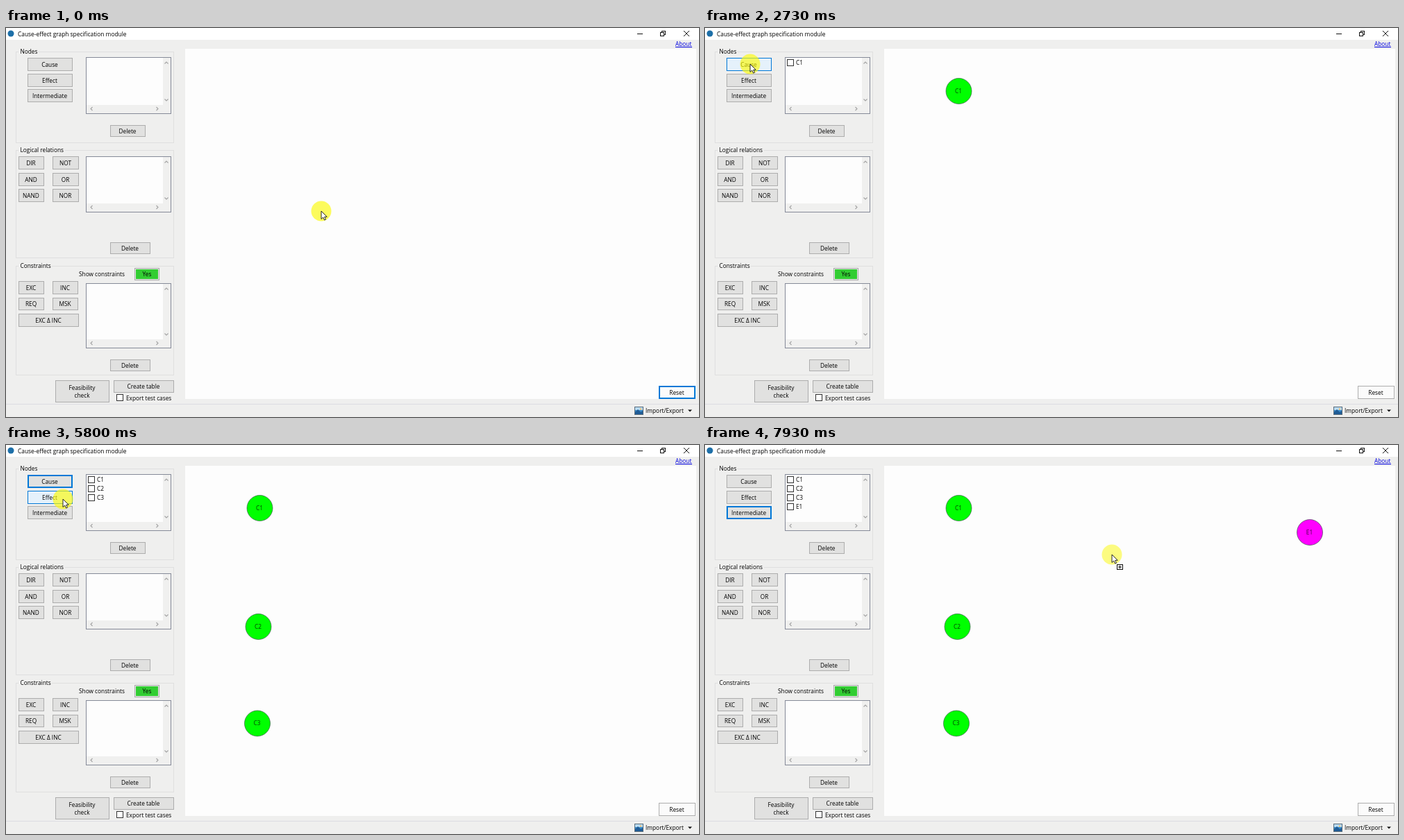
Write an HTML page with a canvas that moves like this. It is 998 px wide and 561 px high and loops after 8000 ms.

```html
<!DOCTYPE html>
<html lang="en">
<head>
<meta charset="utf-8">
<title>Cause-effect graph specification module</title>
<style>
  html, body { margin: 0; width: 100%; height: 100%; overflow: hidden; background: #efefee; }
  canvas { display: block; width: 998px; height: 561px; }
</style>
</head>
<body>
<canvas id="stage" width="998" height="561"></canvas>
<script>
const ctx = document.getElementById('stage').getContext('2d');
const LOOP = 8000;
const BLUE = '#0078d7';

// Pointer path: time, x, y. Repeated positions are pauses.
const path = [
  [0, 454, 264], [470, 454, 264], [860, 240, 142], [1260, 66, 52], [1300, 66, 52],
  [1430, 68, 49], [1700, 68, 49], [1830, 226, 58], [2060, 365, 91], [2150, 365, 91],
  [2640, 65, 52], [2830, 65, 52], [3280, 363, 262], [3400, 363, 262],
  [4150, 78, 46], [4410, 78, 46], [4630, 313, 340], [4800, 361, 401], [4920, 361, 401],
  [5720, 82, 78], [5930, 82, 78], [6550, 871, 126], [6690, 871, 126],
  [7140, 74, 94], [7300, 74, 94], [7370, 78, 87], [7520, 130, 90], [7930, 586, 158], [8000, 586, 158]
];

const drags = [
  { press: 1700, drop: 2120, button: 'Cause' },
  { press: 2830, drop: 3360, button: 'Cause' },
  { press: 4410, drop: 4860, button: 'Cause' },
  { press: 5930, drop: 6650, button: 'Effect' },
  { press: 7290, drop: LOOP, button: 'Intermediate' }
];

const nodes = [
  { label: 'C1', x: 365.5, y: 91, at: 2120, color: '#00ff00' },
  { label: 'C2', x: 363.5, y: 262, at: 3360, color: '#00ff00' },
  { label: 'C3', x: 362, y: 401.5, at: 4860, color: '#00ff00' },
  { label: 'E1', x: 871, y: 126, at: 6650, color: '#ff00ff' }
];

const groups = [['Nodes', 34, 132], ['Logical relations', 176, 156], ['Constraints', 343, 158]];
const lists = [[42, 82], [185, 81], [368, 94]];

const buttons = [
  ['Cause', 31, 43, 65, 19], ['Effect', 31, 66, 65, 19], ['Intermediate', 31, 88, 65, 19],
  ['Delete', 150, 140, 51, 17],
  ['DIR', 18, 185, 37, 19], ['NOT', 67, 185, 38, 19],
  ['AND', 18, 209, 37, 19], ['OR', 67, 209, 38, 19],
  ['NAND', 18, 232, 37, 19], ['NOR', 67, 232, 38, 19],
  ['Delete', 150, 309, 58, 17],
  ['EXC', 18, 365, 37, 19], ['INC', 67, 365, 37, 19],
  ['REQ', 18, 389, 37, 18], ['MSK', 67, 389, 37, 18],
  ['EXC Δ INC', 18, 412, 87, 19],
  ['Delete', 150, 478, 58, 17],
  ['Feasibility\ncheck', 71, 508, 78, 32], ['Create table', 155, 508, 87, 18],
  ['Reset', 940, 516, 53, 19]
];

function text(str, x, y, { align = 'left', color = '#000', size = 8.3 } = {}) {
  ctx.font = `${size}px "Open Sans", "Noto Sans", sans-serif`;
  ctx.textAlign = align;
  ctx.textBaseline = 'alphabetic';
  ctx.fillStyle = color;
  ctx.fillText(str, x, y + 3);
}

function rect(x, y, w, h, fill, stroke, width = 1) {
  if (fill) { ctx.fillStyle = fill; ctx.fillRect(x, y, w, h); }
  if (stroke) {
    ctx.strokeStyle = stroke;
    ctx.lineWidth = width;
    ctx.strokeRect(x + width / 2, y + width / 2, w - width, h - width);
  }
}

function line(points, color, width = 1) {
  ctx.beginPath();
  points.forEach(([x, y]) => ctx.lineTo(x, y));
  ctx.strokeStyle = color;
  ctx.lineWidth = width;
  ctx.stroke();
}

function polygon(points, fill, stroke) {
  ctx.beginPath();
  points.forEach(([x, y]) => ctx.lineTo(x, y));
  ctx.closePath();
  ctx.fillStyle = fill;
  ctx.fill();
  if (stroke) { ctx.strokeStyle = stroke; ctx.lineWidth = 0.9; ctx.stroke(); }
}

function circle(x, y, r, fill, stroke, width = 1) {
  ctx.beginPath();
  ctx.arc(x, y, r, 0, Math.PI * 2);
  if (fill) { ctx.fillStyle = fill; ctx.fill(); }
  if (stroke) { ctx.strokeStyle = stroke; ctx.lineWidth = width; ctx.stroke(); }
}

function checkbox(x, y) {
  rect(x, y, 10, 10, '#fff', '#333');
}

function chevron(x, y, dx, dy) {
  const tail = side => [x - dx * 1.5 + dy * side, y - dy * 1.5 + dx * side];
  line([tail(-2.5), [x + dx, y + dy], tail(2.5)], '#a3a3a3', 1.1);
}

// Cubic Hermite interpolation that comes to rest at pauses.
function pointerAt(t) {
  const i = Math.max(0, path.findIndex((p, k) => k + 1 < path.length && t < path[k + 1][0]));
  const a = path[i], b = path[i + 1];
  const span = b[0] - a[0], u = (t - a[0]) / span;
  const still = (p, q) => !p || !q || (p[1] === q[1] && p[2] === q[2]);
  const slope = (k, axis) => {
    const before = path[k - 1], here = path[k], after = path[k + 1];
    if (still(before, here) || still(here, after)) return 0;
    return (after[axis] - before[axis]) / (after[0] - before[0]);
  };
  const blend = axis => {
    const u2 = u * u, u3 = u2 * u;
    return (2 * u3 - 3 * u2 + 1) * a[axis] + (u3 - 2 * u2 + u) * span * slope(i, axis)
      + (3 * u2 - 2 * u3) * b[axis] + (u3 - u2) * span * slope(i + 1, axis);
  };
  return { x: blend(1), y: blend(2) };
}

function drawWindow() {
  rect(0, 0, 998, 561, '#efefee');
  rect(0, 0, 998, 17, '#fff');
  circle(7, 8, 4.5, '#1d6fa8');
  text('Cause-effect graph specification module', 17, 8.5, { size: 8.4 });
  line([[909, 8.5], [917, 8.5]], '#111');
  rect(944, 4, 6, 6, null, '#111');
  rect(942, 6, 6, 6, '#fff', '#111');
  line([[976, 4], [984, 12]], '#111');
  line([[984, 4], [976, 12]], '#111');
  text('About', 964, 23, { color: '#0000e0' });
  line([[964, 27.5], [988, 27.5]], '#0000e0');

  rect(258, 30, 736, 505, '#fdfdfd');
  line([[0, 542.5], [998, 542.5]], '#dcdce2');
  rect(905, 546, 13, 12, '#3c8dcb', '#5b6d7c');
  rect(906, 547, 11, 4, '#b9dcf3');
  polygon([[906, 557], [906, 554], [910, 550], [914, 554], [917, 552], [917, 557]], '#1f5c96');
  circle(914, 549.5, 1.2, '#f0c070');
  text('Import/Export', 921, 552);
  polygon([[982, 550.5], [988, 550.5], [985, 553.5]], '#111');
}

function drawPanels() {
  groups.forEach(([label, y, h]) => {
    rect(14, y, 228, h, null, '#dfdfdf');
    const width = { Nodes: 28, Constraints: 48 }[label] || 67;
    rect(18, y - 3, width, 7, '#efefee');
    text(label, 20.5, y);
  });

  lists.forEach(([y, h]) => {
    rect(115, y, 123, h, '#fdfdfd', '#858a98');
    rect(226, y + 1, 11, h - 2, '#f0f0ef');
    rect(116, y + h - 13, 121, 12, '#f0f0ef');
    chevron(231, y + 8, 0, -1);
    chevron(231, y + h - 20, 0, 1);
    chevron(123, y + h - 7.5, -1, 0);
    chevron(218, y + h - 7.5, 1, 0);
  });

  text('Show constraints', 105, 355);
  rect(185, 346, 36, 18, '#e8e8e8', '#aaa');
  rect(187, 348, 32, 14, '#32cd32');
  text('Yes', 203, 355, { align: 'center' });
  checkbox(159, 528);
  text('Export test cases', 173, 533.5);
}

function drawButtons(focused, pointer, dragging) {
  buttons.forEach(([label, x, y, w, h]) => {
    const inside = pointer.x >= x && pointer.x < x + w && pointer.y >= y && pointer.y < y + h;
    const hover = inside && !dragging;
    const focus = label === focused && !hover;
    const base = label === 'Reset' ? '#fbfbfb' : '#e1e1e0';
    rect(x, y, w, h, hover ? '#e5f1fb' : base, hover || focus ? BLUE : '#adadad', focus ? 2 : 1);
    const lines = label.split('\n');
    lines.forEach((part, i) => {
      const middle = y + h / 2 + (i - (lines.length - 1) / 2) * 11;
      text(part, x + w / 2 - 0.5, middle, { align: 'center' });
    });
  });
}

function drawNodes(t) {
  nodes.filter(node => t >= node.at).forEach((node, i) => {
    const row = 50 + i * 13.1;
    checkbox(118, Math.round(row) - 5);
    text(node.label, 131, row);
    circle(node.x, node.y, 18.5, node.color, 'rgba(40,70,60,.75)', 0.8);
    text(node.label, node.x - 0.5, node.y - 0.3, { align: 'center', color: 'rgba(0,0,0,.75)' });
  });
}

function drawArrow(x, y) {
  polygon([[0, 0], [0, 11.5], [2.7, 9], [4.6, 13], [6.5, 12.2], [4.7, 8.3], [8.2, 8.3]]
    .map(([dx, dy]) => [x + dx, y + dy]), '#fff', '#111');
}

function drawPointer({ x, y }, dragging) {
  circle(x, y, 14.5, dragging ? 'rgba(252,250,30,.56)' : 'rgba(252,250,10,.66)');
  if (!dragging) return drawArrow(x, y);
  if (x < 258) {
    circle(x + 11, y + 11, 5.6, '#fff', '#111', 1.7);
    line([[x + 7, y + 7], [x + 15, y + 15]], '#111', 1.7);
    return;
  }
  drawArrow(x, y);
  rect(Math.round(x) + 7, Math.round(y) + 14, 9, 8, '#fff', '#111');
  line([[x + 9, y + 18], [x + 14, y + 18]], '#111');
  line([[x + 11.5, y + 15.7], [x + 11.5, y + 20.3]], '#111');
}

function drawClickRing(t, press) {
  const age = t - press;
  if (age < 0 || age > 320) return;
  const origin = pointerAt(press);
  circle(origin.x, origin.y, 2 + age * 0.023, null, `rgba(110,195,50,${0.85 - age / 640})`, 1.4);
}

function draw(t) {
  const pointer = pointerAt(t);
  const latest = drags.filter(drag => t >= drag.press).pop();
  const dragging = Boolean(latest) && t < latest.drop;

  drawWindow();
  drawPanels();
  drawButtons(latest ? latest.button : 'Reset', pointer, dragging);
  drawNodes(t);
  if (latest) drawClickRing(t, latest.press);
  drawPointer(pointer, dragging);
}

const start = performance.now();
function tick() {
  draw((performance.now() - start) % LOOP);
  requestAnimationFrame(tick);
}
tick();
</script>
</body>
</html>
```
